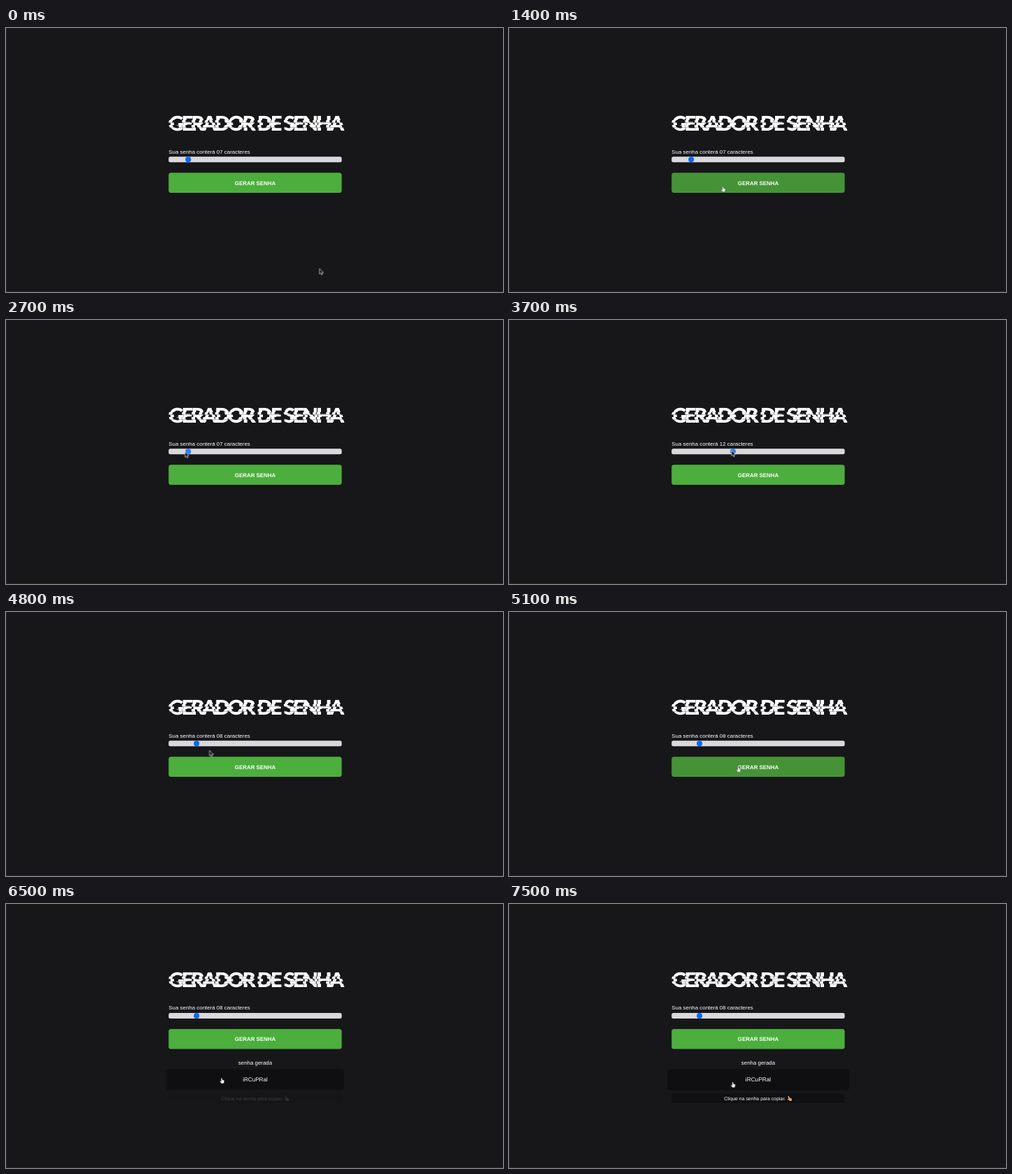
These frames come from a looping animation (710x378 px, 8000 ms). An HTML page:

```html
<!DOCTYPE html>
<html lang="pt-BR">
<head>
<meta charset="utf-8">
<title>Gerador de senha</title>
<style>
@property --count { syntax: "<integer>"; inherits: true; initial-value: 7; }

html, body { margin: 0; width: 100%; height: 100%; overflow: hidden; background: #171719; }
svg { display: block; width: 100vw; height: 100vh; }
text, .label { font-family: "Liberation Sans", Arial, sans-serif; fill: #fff; color: #fff; }
text { font-size: 7.9px; text-rendering: geometricPrecision; }
.mid { text-anchor: middle; }
#title text { font: 900 29px Lato, sans-serif; letter-spacing: -3px; }
.label { font-size: 16px; line-height: 16px; white-space: nowrap; }
.label b { font-weight: 400; }
.label b::before { counter-reset: n var(--count); content: counter(n, decimal-leading-zero); }

.form, .slider, .thumb, .button, .result, .box, .hint, .cursor, .arrow, .hand {
  animation: 8s linear infinite;
}
.form { animation-name: lift; animation-timing-function: step-end; }
.slider { animation-name: count; }
.thumb { transform: translateX(calc((var(--count) - 5) * 11.93px)); animation-name: thumb; }
.button { fill: #4cae3c; animation-name: button; }
.result { animation-name: reveal; animation-timing-function: step-end; }
.box { transform-origin: 356px 251.3px; animation-name: grow; }
.hint { animation-name: hint; }
.cursor { animation-name: move; }
.arrow { animation-name: arrow; animation-timing-function: step-end; }
.hand { animation-name: hand; animation-timing-function: step-end; }

@keyframes lift { 0% { transform: none } 67.45%, 100% { transform: translateY(-28.2px) } }
@keyframes reveal { 0% { opacity: 0 } 67.45%, 100% { opacity: 1 } }
@keyframes count {
  0%, 33.75% { --count: 7 }
  35% { --count: 6 }
  36.25% { --count: 10 }
  37.5% { --count: 16 }
  38.75% { --count: 21 }
  40% { --count: 20 }
  41.25% { --count: 16 }
  42.5%, 47% { --count: 12 }
  50% { --count: 9 }
  51.25%, 53.75% { --count: 7 }
  55%, 100% { --count: 8 }
}
@keyframes thumb {
  0%, 31% { fill: #0867fb }
  32.5%, 57.5% { fill: #2f80f3 }
  58.75%, 100% { fill: #0867fb }
}
@keyframes button {
  0%, 15% { fill: #4cae3c }
  17%, 20.3% { fill: #459336 }
  21.25%, 61% { fill: #4cae3c }
  62.5%, 67.4% { fill: #459336 }
  67.45%, 100% { fill: #4cae3c }
}
@keyframes grow { 0%, 79.5% { transform: none } 83%, 100% { transform: scale(1.05) } }
@keyframes hint { 0%, 80% { opacity: 0 } 87.5%, 100% { opacity: 1 } }
@keyframes arrow {
  0% { opacity: 1 } 15% { opacity: 0 } 20.8% { opacity: 1 } 61.2% { opacity: 0 }
  67.45% { opacity: 1 } 79.5%, 100% { opacity: 0 }
}
@keyframes hand {
  0% { opacity: 0 } 15% { opacity: 1 } 20.8% { opacity: 0 } 61.2% { opacity: 1 }
  67.45% { opacity: 0 } 79.5%, 100% { opacity: 1 }
}
@keyframes move {
  0%, 2.5% { transform: translate(447.8px, 344.5px) }
  3.75% { transform: translate(448px, 341px) }
  5%, 7.5% { transform: translate(448px, 338.5px) }
  8.75%, 10% { transform: translate(448px, 337.5px) }
  12.5% { transform: translate(444px, 314px) }
  13.75% { transform: translate(409px, 284px) }
  15% { transform: translate(355px, 248px) }
  17.5% { transform: translate(305.5px, 226.7px) }
  21.25%, 22.5% { transform: translate(282px, 204.5px) }
  28% { transform: translate(264px, 194px) }
  32.5%, 33.75% { transform: translate(255.8px, 188.6px) }
  35% { transform: translate(246px, 188.5px) }
  36.25% { transform: translate(296px, 188px) }
  37.5% { transform: translate(367px, 187.5px) }
  38.75% { transform: translate(427px, 187px) }
  40% { transform: translate(415px, 187px) }
  41.25% { transform: translate(367px, 187px) }
  42.5%, 47% { transform: translate(318px, 186.7px) }
  50% { transform: translate(284px, 187px) }
  51.25%, 53.75% { transform: translate(262px, 188px) }
  55%, 57.5% { transform: translate(276px, 188.5px) }
  60% { transform: translate(290.5px, 198px) }
  62.5% { transform: translate(318px, 216px) }
  63.75%, 75% { transform: translate(327.3px, 221.3px) }
  76.25% { transform: translate(322px, 215px) }
  78.75% { transform: translate(302px, 232px) }
  81.25% { transform: translate(308px, 249px) }
  85%, 93.6% { transform: translate(319px, 254.2px) }
  93.75%, 100% { transform: translate(319.5px, 254.7px) }
}
</style>
</head>
<body>
<svg viewBox="0 0 710 378">
  <defs>
    <g id="title">
      <text x="232.5" y="147">GERADOR</text>
      <text x="358.5" y="147">DE</text>
      <text x="396.5" y="147">SENHA</text>
    </g>
    <clipPath id="cut1"><rect x="220" y="120" width="270" height="12"/></clipPath>
    <clipPath id="cut2"><rect x="220" y="132" width="270" height="3.5"/></clipPath>
    <clipPath id="cut3"><rect x="220" y="135.5" width="270" height="3.5"/></clipPath>
    <clipPath id="cut4"><rect x="220" y="139" width="270" height="3.5"/></clipPath>
    <clipPath id="cut5"><rect x="220" y="142.5" width="270" height="8"/></clipPath>
  </defs>

  <path d="M.5 0V377.5H710" fill="none" stroke="#29292b"/>

  <g class="form">
    <use href="#title" x=".4" clip-path="url(#cut1)"/>
    <use href="#title" x="-.9" clip-path="url(#cut2)"/>
    <use href="#title" x="1.4" clip-path="url(#cut3)"/>
    <use href="#title" x="-1" clip-path="url(#cut4)"/>
    <use href="#title" x=".3" clip-path="url(#cut5)"/>

    <g class="slider">
      <foreignObject width="300" height="20" transform="translate(232.3 173.2) scale(.494)">
        <div class="label">Sua senha conterá <b></b> caracteres</div>
      </foreignObject>
      <rect x="232.3" y="184.2" width="247.3" height="8" rx="2.5" fill="#d9d9db"/>
      <circle class="thumb" cx="236.4" cy="188.2" r="4"/>
    </g>

    <rect class="button" x="232.3" y="207.2" width="247.3" height="28.8" rx="3.5"/>
    <text class="mid" x="356" y="224.5" font-weight="700">GERAR SENHA</text>
  </g>

  <g class="result">
    <text class="mid" x="356" y="230">senha gerada</text>
    <g class="box">
      <rect x="232.3" y="236.9" width="247.3" height="28.8" rx="3.5" fill="#0f0f11"/>
      <text class="mid" x="356" y="254.1">iRCuPRal</text>
    </g>
    <g class="hint">
      <rect x="232.3" y="271.8" width="247.3" height="13.2" rx="3" fill="#101012"/>
      <text x="307.3" y="280.8" style="font-size:6.92px">Clique na senha para copiar.</text>
      <path d="M398.3 275.2Q399 274.2 399.8 275.2L401 277.6L403.4 278.2Q404.5 279.2 403.9 281.8H400.5L398 279.4Q398.3 278.4 399.6 278.8Z" fill="#d9a27e"/>
    </g>
  </g>

  <g class="cursor">
    <path class="arrow" d="M0 0V7.9L1.8 6.3L3 9L4.3 8.4L3.1 5.8H5.6Z" fill="#111" stroke="#e8e8e8" stroke-width=".7"/>
    <path class="hand" d="M-1 .6Q0-.6 .8 .6L1.2 2.8L3.2 3.2Q4 3.5 3.8 5L3 8H-.4L-2.4 5.2Q-2.6 4 -1.4 4.3L-.5 5Z" fill="#fff" stroke="#222" stroke-width=".5"/>
  </g>
</svg>
</body>
</html>
```
